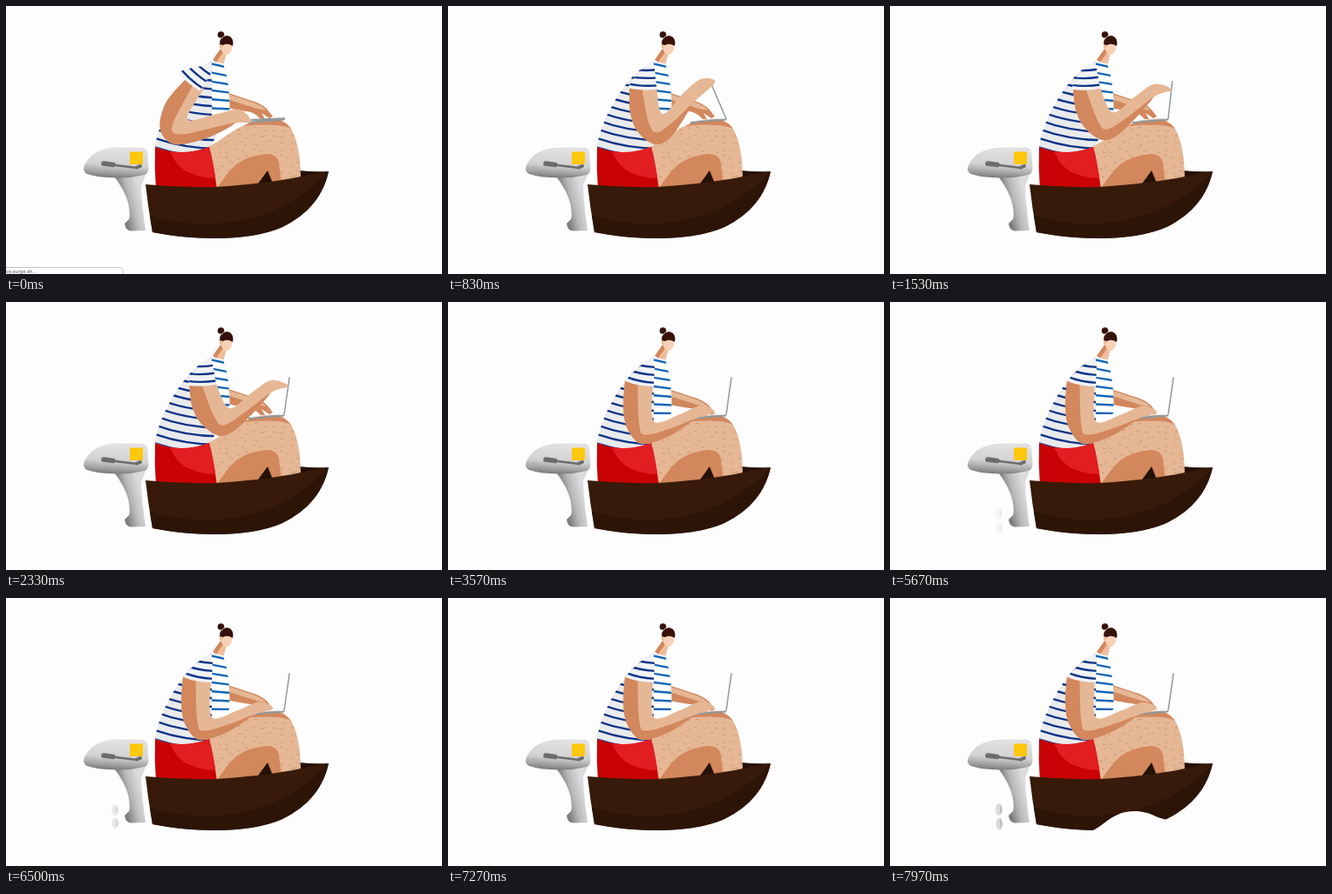
Write an HTML page that moves like this. It is 500 px wide and 308 px high and loops after 8000 ms.

```html
<!DOCTYPE html>
<html lang="en">
<head>
<meta charset="utf-8">
<title>Boat</title>
<style>
html, body { margin: 0; width: 100%; height: 100%; overflow: hidden; background: #fdfdfd; }
svg { display: block; width: 100vw; height: 100vh; }
</style>
</head>
<body>
<svg viewBox="0 0 500 308" xmlns="http://www.w3.org/2000/svg">
  <defs>
    <linearGradient id="metal" x1=".4" y1="0" x2=".25" y2="1">
      <stop offset="0" stop-color="#e2e2e2"/><stop offset=".55" stop-color="#d2d2d2"/><stop offset=".8" stop-color="#a2a2a2"/><stop offset="1" stop-color="#717171"/>
    </linearGradient>
    <linearGradient id="shaft" gradientUnits="userSpaceOnUse" x1="134" y1="232" x2="157" y2="226">
      <stop offset="0" stop-color="#7c7c7c"/><stop offset=".45" stop-color="#b8b8b8"/><stop offset="1" stop-color="#dcdcdc"/>
    </linearGradient>
    <clipPath id="shirtClip"><path id="shirtShape" d="M237 62Q222 70 211 82C191 104 174 138 171 162Q201 175 235 163L246 135 256 128Q258 92 249 66Q242 66 237 62Z"/></clipPath>
    <clipPath id="frontClip"><path id="frontShape" d="M236 60L252 64 262 130 236 140Z"/></clipPath>
    <clipPath id="sleeveClip"><path id="sleeveShape" d="M233 65Q222 71 211 82L203 91Q219 97 236 97L237 72Z"/></clipPath>
    <clipPath id="legClip"><path id="legShape" d="M232 162C252 152 270 131 302 130Q320 129 328 143Q338 162 338 202L240 212Z"/></clipPath>
    <clipPath id="shortsClip"><path id="shortsShape" d="M171 162Q201 174 233 162Q238 180 242 211H172Q170 186 171 162Z"/></clipPath>
    <clipPath id="hullClip"><path id="hullShape" d="M160 205Q200 209 240 208Q300 204 338 196L370 190C364 217 348 239 316 254.5C280 270 220 270 168 260Q163 232 160 205Z"/></clipPath>
  </defs>

  <g id="motor" stroke-linecap="round">
    <path d="M125 197Q136 212 140 226Q143 240 141 245L136 250Q137 258 143 258.5L160 258Q156 230 155 207L160 194Z" fill="url(#shaft)"/>
    <path d="M89 187Q89 181 99 171Q110 163 127 162.500L156 162.500Q161 163 162 167L163.500 186Q163 193 159 194Q143 198 127 197.500Q104 197 93 193Q89 191 89 187Z" fill="url(#metal)"/>
    <rect x="142" y="167.500" width="15" height="14.500" rx="1" fill="#fdc70a"/>
    <g stroke="#6c6c6c">
      <path d="M112 181L123 182.500" stroke-width="5.500"/>
      <path d="M122 182.500L150 186" stroke-width="2.500"/>
      <path d="M150 185.500L154 184" stroke-width="4"/>
    </g>
  </g>
  <g id="propeller" fill="#dcdcdc">
    <ellipse cx="125" cy="-8" rx="4" ry="7"/><ellipse cx="125.500" cy="8.500" rx="4" ry="7"/>
    <path d="M126 -14Q131 -8 126 -2ZM126 2.500Q131 8.500 126 14.500Z" fill="#bdbdbd"/>
  </g>

  <g id="farArm">
    <path d="M252 99Q267 104 279 108Q291 111 299 118L306 127 302 129 293 123 297 130 292 130Q284 121 275 121L252 117Z" fill="#d2875c"/>
    <path d="M254 101Q269 106 281 110Q293 114 299 120L288 118 272 113 254 107Z" fill="#e6b795"/>
  </g>

  <path d="M246 49L237 62Q242 67 249.500 66L252 56Z" fill="#d2875c"/>
  <path d="M249 53L241 64.500Q245 67 249.500 66L252 56Z" fill="#f0bd9b"/>
  <path d="M246 44H259Q260 54 253 56.500Q247 56 246 44Z" fill="#f8d0b6"/>
  <ellipse cx="246.500" cy="46" rx="1.700" ry="3" fill="#f0bd9b"/>
  <path d="M245 44Q245 34 254 34Q262 36 260 46Q254 42 249 45Z" fill="#35110a"/>
  <ellipse cx="246.500" cy="33" rx="3.800" ry="3.800" fill="#35110a"/>
  <path d="M244.500 38Q248 37.500 250.500 34" fill="none" stroke="#fdfdfd" stroke-width=".8"/>

  <use href="#shirtShape" fill="#e9eaec"/>
  <g id="backStripes" clip-path="url(#shirtClip)"/>
  <g clip-path="url(#shirtClip)">
    <use href="#frontShape" fill="#fff"/>
    <g id="frontStripes" clip-path="url(#frontClip)"/>
  </g>

  <path d="M336 189Q352 191 370 190L338 202Z" fill="#251006"/>
  <use href="#legShape" fill="#e6b795"/>
  <g id="hairs" clip-path="url(#legClip)" stroke="#c18c69" stroke-width=".7" stroke-linecap="round"/>
  <path d="M274 137Q292 129 312 130Q324 132 327 141Q312 134 274 138Z" fill="#d2875c" clip-path="url(#legClip)"/>
  <path d="M241 211Q253 192 264 182Q280 171 299 170Q312 170 313 182L316 204Z" fill="#d2875c"/>
  <path d="M287 207L300 189 306 204Z" fill="#251006"/>
  <use href="#shortsShape" fill="#c90205"/>
  <path d="M187 160Q193 197 241 198V155Z" fill="#e31e20" clip-path="url(#shortsClip)"/>
  <use href="#hullShape" fill="#371a09"/>
  <path d="M160 239C225 262 315 253 372 188V280H160Z" fill="#2c1407" clip-path="url(#hullClip)"/>

  <path d="M278 134L319 130.500" stroke="#8f9699" stroke-width="2"/>
  <path d="M285 132L314 129" stroke="#c9ced0" stroke-width="1" stroke-dasharray="2 1"/>
  <path id="screen" stroke="#929a9d" stroke-linecap="round"/>

  <path id="arm" fill="#e6b795"/>
  <path id="armShade" fill="#d2875c"/>
  <g id="sleeve">
    <use href="#sleeveShape" fill="#f1f2f3"/>
    <g id="sleeveStripes" clip-path="url(#sleeveClip)"/>
  </g>

  <path id="wave" fill="#fdfdfd" d="M233 267C246 261 256 245 280 245C298 245 303 252 316 254.500L331 271V300H225Z"/>
  <g id="status">
    <path d="M-2 300.500H131Q134 301 134 304V310H-2Z" fill="#fff" stroke="#c4c4c4"/>
    <text x="0" y="307" font-family="Roboto, sans-serif" font-size="6" fill="#555">oy.surge.sh...</text>
  </g>
</svg>
<script>
const DURATION = 8000;
const get = id => document.getElementById(id);
const clamp = v => Math.max(0, Math.min(1, v));
const ease = v => v * v * (3 - 2 * v);
const mix = (a, b, k) => a + (b - a) * k;
const mixAll = (a, b, k) => a.map((v, i) => mix(v, b[i], k));

// Arm outline runs from the outer shoulder round the fingertips to the inner shoulder.
const poses = {
  closed: { sleeve: 30, tip: [281, 131], arm: [206,84, 183,112, 177,142, 194,159, 232,151, 262,135, 281,133, 268,119, 242,124, 208,130, 227,95] },
  lift: { sleeve: -8, tip: [302, 90], arm: [208,92, 209,122, 218,145, 238,159, 257,149, 279,114, 306,88, 290,84, 270,100, 246,124, 239,92] },
  open: { sleeve: -12, tip: [325, 87], arm: [210,94, 214,122, 226,142, 247,154, 270,141, 303,105, 324,97, 304,90, 282,104, 256,122, 240,91] },
  type: { sleeve: 0, tip: [325, 87], arm: [203,90, 201,122, 206,146, 222,163, 254,154, 282,136, 306,127, 290,120, 266,129, 236,137, 235,92] }
};
const steps = [[0, 'closed'], [100, 'closed'], [830, 'lift'], [1650, 'open'], [2330, 'open'], [3100, 'type'], [DURATION, 'type']];

function poseAt(t) {
  const i = Math.max(1, steps.findIndex(s => s[0] > t));
  const [t0, from] = steps[i - 1], [t1, to] = steps[i];
  const k = ease((t - t0) / (t1 - t0));
  const a = poses[from], b = poses[to];
  const flat = mixAll(a.arm, b.arm, k);
  const arm = [];
  for (let n = 0; n < flat.length; n += 2) arm.push([flat[n], flat[n + 1]]);
  return { sleeve: mix(a.sleeve, b.sleeve, k), tip: mixAll(a.tip, b.tip, k), arm };
}

function smooth(points) {
  const at = i => points[Math.max(0, Math.min(points.length - 1, i))];
  let d = 'M' + points[0];
  for (let i = 0; i < points.length - 1; i++) {
    const c1 = at(i).map((v, n) => v + (at(i + 1)[n] - at(i - 1)[n]) / 6);
    const c2 = at(i + 1).map((v, n) => v - (at(i + 2)[n] - at(i)[n]) / 6);
    d += `C${c1} ${c2} ${at(i + 1)}`;
  }
  return d + 'Z';
}

// Shade follows the outer edge and returns through the middle of the limb.
function shadeOf(arm) {
  const inner = [[4, 8, .4], [3, 9, .4], [2, 9, .45], [0, 10, .45]];
  return smooth([...arm.slice(0, 6), ...inner.map(([a, b, k]) => mixAll(arm[a], arm[b], k))]);
}

function addPath(parent, d, attrs = {}) {
  const path = document.createElementNS('http://www.w3.org/2000/svg', 'path');
  for (const [name, value] of Object.entries({ d, fill: 'none', ...attrs })) path.setAttribute(name, value);
  get(parent).append(path);
}

const navy = { stroke: '#0c3488', 'stroke-width': 2.4 };
const blue = { stroke: '#1266b5', 'stroke-width': 2.4 };
for (let y = 74; y < 175; y += 9.8) {
  const drop = 14 + (165 - y) / 10;
  addPath('backStripes', `M160 ${y - drop}Q200 ${y + 2} 245 ${y + 2}`, navy);
}
for (let y = 69; y < 135; y += 9.8) {
  const slope = (130 - y) / 20;
  addPath('frontStripes', `M234 ${y - slope}L260 ${y + slope}`, blue);
}
for (let y = 74; y < 98; y += 9) addPath('sleeveStripes', `M198 ${y - 9}Q215 ${y} 240 ${y + 1}`, navy);

let seed = 7;
const random = () => (seed = seed * 16807 % 2147483647) / 2147483647;
for (let y = 139; y < 204; y += 8) {
  for (let x = 240; x < 338; x += 10) {
    const px = x + random() * 7, py = y + random() * 5;
    addPath('hairs', `M${px} ${py}l${2 + random() * 1.5} ${random() * 2 - .3}`);
  }
}

function draw(t) {
  const { sleeve, tip, arm } = poseAt(t);
  const typing = clamp((t - 3100) / 200);
  const tap = typing * Math.sin(t / 65);
  for (const point of arm.slice(5, 8)) {
    point[0] += tap * .5;
    point[1] += tap * .8;
  }

  get('arm').setAttribute('d', smooth(arm));
  get('armShade').setAttribute('d', shadeOf(arm));
  get('sleeve').setAttribute('transform', `rotate(${sleeve} 228 72)`);
  get('farArm').setAttribute('transform', `translate(0 ${-tap * .7})`);

  const opened = clamp(t / 830);
  const dx = tip[0] - 319, dy = tip[1] - 129.5;
  const length = mix(37, 43, opened) / Math.hypot(dx, dy);
  get('screen').setAttribute('d', `M319 129.5L${319 + dx * length} ${129.5 + dy * length}`);
  get('screen').setAttribute('stroke-width', mix(2.4, 1.5, opened));

  const spin = Math.abs(Math.cos((t - 7970) / 933 * 2 * Math.PI));
  get('propeller').setAttribute('transform', `translate(0 251) scale(1 ${spin})`);
  get('propeller').setAttribute('opacity', clamp((t - 5030) / 2500));

  const sunk = 1 - ease(clamp((t - 7450) / 520));
  get('wave').setAttribute('transform', `translate(0 ${sunk * 27})`);
  get('status').setAttribute('opacity', 1 - clamp((t - 30) / 250));
}

const start = performance.now();
function tick() {
  draw((performance.now() - start) % DURATION);
  requestAnimationFrame(tick);
}
tick();
</script>
</body>
</html>
```
